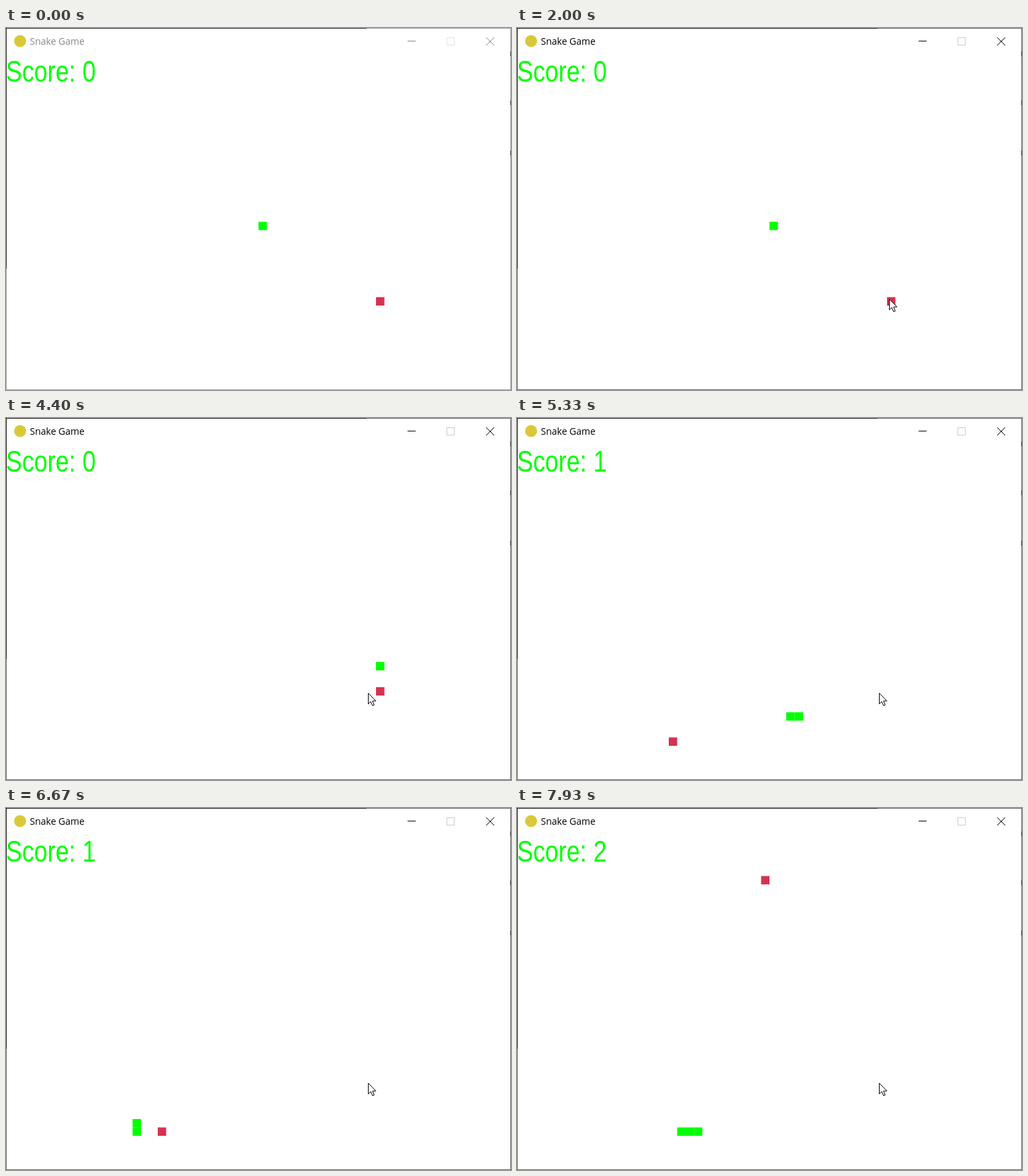
Animation, 752 px wide and 540 px high, one loop 8000 ms. Source, as an HTML page with a canvas:

```html
<!DOCTYPE html>
<html lang="en">
<head>
<meta charset="utf-8">
<title>Snake Game</title>
<style>
  html, body { margin: 0; width: 100%; height: 100%; overflow: hidden; background: #fff; }
  canvas { display: block; }
</style>
</head>
<body>
<canvas id="stage" width="752" height="540"></canvas>
<script>
const ctx = document.getElementById('stage').getContext('2d');
const LOOP = 8000, FPS = 15, CELL = 12.5;
const MOVE_START = 3381, MOVE_TIME = 50.4, ACTIVATE = 1990;

// Corners of the snake's route, in grid cells
const route = [[30, 20], [44, 20], [44, 32], [29, 32], [29, 38], [15, 38],
               [15, 29], [11, 29], [11, 35], [23, 35]];
const foods = [[44, 29], [18, 35], [29, 5]];

const path = [route[0]];
for (const [cx, cy] of route.slice(1)) {
  let [x, y] = path[path.length - 1];
  while (x !== cx || y !== cy) {
    x += Math.sign(cx - x);
    y += Math.sign(cy - y);
    path.push([x, y]);
  }
}
const meals = foods.slice(0, 2).map(([fx, fy]) =>
  path.findIndex(([x, y]) => x === fx && y === fy));

const clamp = v => Math.max(0, Math.min(1, v));
const mix = (a, b, p) => a + (b - a) * p;

function rect(color, x, y, w, h) {
  ctx.fillStyle = color;
  ctx.fillRect(x, y, w, h);
}

function cell([x, y], color) {
  rect(color, 1 + x * CELL, 39 + y * CELL, CELL, CELL);
}

function text(str, x, y, font, color) {
  ctx.font = font;
  ctx.fillStyle = color;
  ctx.fillText(str, x, y);
}

function drawWindow(active) {
  const ink = active ? '#000' : '#888';
  const edge = active ? '#6a6a6a' : '#a0a0a0';
  const dark = active ? '#1c1c1c' : '#303030';
  rect('#fff', 0, 0, 752, 540);
  rect(edge, 0, 0, 752, 1);
  rect(edge, 0, 539, 752, 1);
  rect(edge, 0, 0, 1, 540);
  rect(edge, 751, 0, 1, 540);
  rect(dark, 0, 0, 537, 1);
  rect(dark, 0, 0, 1, 359);
  for (const y of [35, 108, 183]) rect(dark, 751, y, 1, 7);

  ctx.fillStyle = '#d9c93a';
  ctx.beginPath();
  ctx.arc(21, 19.5, 9, 0, Math.PI * 2);
  ctx.fill();
  text('Snake Game', 35.5, 25, '14px "Open Sans", "Noto Sans", sans-serif', ink);

  rect(ink, 598, 19, 12, 1);
  ctx.lineWidth = 1;
  ctx.strokeStyle = active ? '#ccc' : '#e2e2e2';
  ctx.strokeRect(656.5, 14.5, 11, 11);
  ctx.strokeStyle = ink;
  ctx.beginPath();
  ctx.moveTo(715, 14);
  ctx.lineTo(727, 26);
  ctx.moveTo(727, 14);
  ctx.lineTo(715, 26);
  ctx.stroke();
}

function drawScore(score) {
  ctx.save();
  ctx.scale(0.82, 1); // condensed face
  text('Score: ' + score, 0, 80, '43.75px "Liberation Sans", Arial, sans-serif', '#0f0');
  ctx.restore();
}

function drawPointer(t) {
  if (t < 1130) return;
  const enter = 1 - (1 - clamp((t - 1133) / 800)) ** 2;
  const nudge = clamp((t - 2533) / 267);
  ctx.save();
  ctx.translate(mix(mix(681, 554, enter), 539, nudge) + 0.5,
                mix(mix(447, 404, enter), 410, nudge) + 0.5);
  const arrow = new Path2D('M0 0V16L3.7 12.6L6.3 18.6L8.8 17.6L6.3 11.6H11.3Z');
  ctx.fillStyle = '#fff';
  ctx.fill(arrow);
  ctx.strokeStyle = '#000';
  ctx.stroke(arrow);
  ctx.restore();
}

function draw(now) {
  const t = Math.floor((now % LOOP + 5) * FPS / 1000) * 1000 / FPS;
  const moves = Math.max(0, Math.floor((t - MOVE_START) / MOVE_TIME));
  const score = meals.filter(m => moves > m).length;

  drawWindow(t >= ACTIVATE);
  drawScore(score);
  cell(foods[score], '#d53250');
  for (let i = 0; i <= score; i++) cell(path[Math.max(0, moves - i)], '#0f0');
  drawPointer(t);
  requestAnimationFrame(draw);
}
requestAnimationFrame(draw);
</script>
</body>
</html>
```
